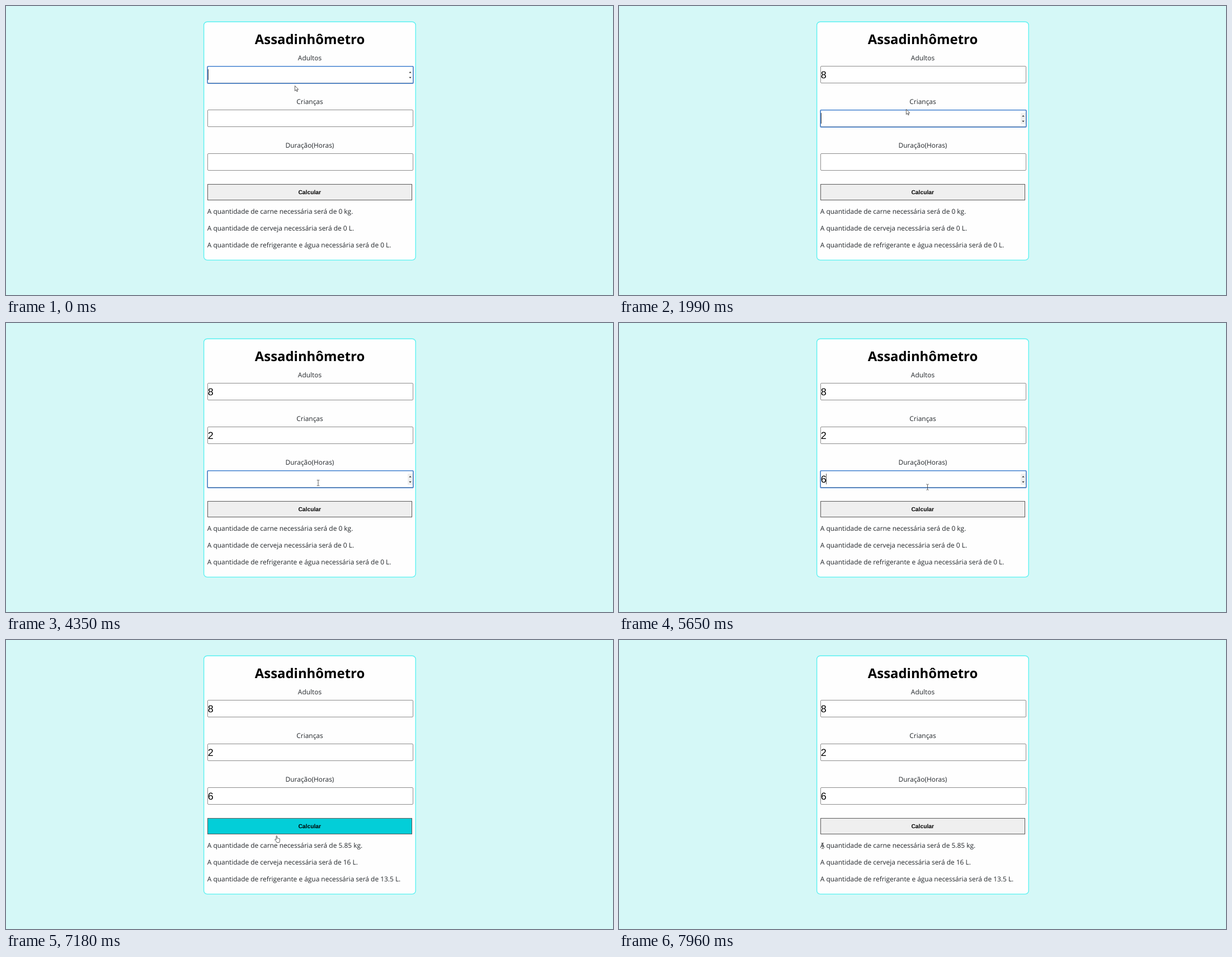
An HTML page that plays this animation: 1085x516 px, repeating every 8 s.

```html
<!DOCTYPE html>
<html lang="pt">
<head>
<meta charset="utf-8">
<style>
html, body { margin: 0; height: 100%; overflow: hidden; background: #d5f8f7; }
svg { display: block; width: 100%; height: 100%; }
text { font: 11.93px "Open Sans", sans-serif; fill: #212529; text-rendering: geometricPrecision; }
.mid { text-anchor: middle; }
.title { font-size: 23.9px; font-weight: 700; fill: #000; }
.digit { font: 17.9px "Liberation Sans", Arial, sans-serif; fill: #000; }
.action { font: bold 10.3px "Liberation Sans", Arial, sans-serif; fill: #000; }
.box { fill: #fff; stroke: #8c8c8c; }
.ring { fill: none; stroke: #4482d0; stroke-width: 1.5; }
.pointer { fill: #fff; stroke: #333; stroke-width: .8; stroke-linejoin: round; }
</style>
</head>
<body>
<svg viewBox="0 0 1085 516">
  <rect x="353.6" y="28.2" width="378.6" height="425.4" rx="6" fill="#fefefe" stroke="#5cf1f1" stroke-width="1.4"/>
  <text class="mid title" x="543" y="68">Assadinhômetro</text>
  <g id="fields"></g>
  <rect id="button" x="360.5" y="318.4" width="365" height="28" stroke="#555"/>
  <text class="mid action" x="542.7" y="335.5">Calcular</text>
  <g id="results"></g>
  <path id="pointer" class="pointer"/>
</svg>
<script>
const $ = id => document.getElementById(id);
const LOOP = 8000;
const HOVER = [5920, 7300], RESULT = 6780;

// Each field: focus span, typing time, spans with a visible caret
const fields = [
  { label: 'Adultos', value: 8, focus: [0, 1590], typed: 650, caret: [[0, 250], [650, 1220]] },
  { label: 'Crianças', value: 2, focus: [1590, 3800], typed: 2890, caret: [[1590, 2110], [2610, 3410]] },
  { label: 'Duração(Horas)', value: 6, focus: [3800, 6500], typed: 5380, caret: [[3800, 4350], [4850, 5920]] }
];
const results = [['carne', 5.85, 'kg'], ['cerveja', 16, 'L'], ['refrigerante e água', 13.5, 'L']];

const shapes = {
  none: '',
  arrow: 'M.4 .4V9.6L2.5 7.6 3.9 10.8 5.3 10.2 3.9 7.1H6.7Z',
  beam: 'M-2.2-5H-.6L0-4.4 .6-5H2.2M-2.2 5H-.6L0 4.4 .6 5H2.2M0-4.4V4.4',
  hand: 'M3 7.6V1.4Q3 .5 3.8 .5T4.6 1.4V5Q5.4 4.4 6.2 5.2 7 4.6 7.7 5.5 9.3 5 9.3 6.8V9.2Q9.2 11 8.3 12.6H4.2Q3.6 11 1 8.2 .2 7 1.2 6.7 2.2 6.6 3 7.6Z'
};
// time, shape, x, y
const moves = [
  [0, 'arrow', 516, 142], [1990, 'arrow', 513, 184], [2110, 'beam', 514.5, 204],
  [2360, 'none', 0, 0], [3290, 'beam', 519.5, 208], [3410, 'arrow', 535, 243],
  [3530, 'beam', 549.5, 273], [3650, 'beam', 556.5, 283], [3800, 'beam', 558, 285.5],
  [5530, 'beam', 555.5, 289], [5650, 'beam', 551.5, 293], [5800, 'arrow', 548, 305],
  [5920, 'hand', 541, 321], [6040, 'hand', 540.5, 325], [6190, 'hand', 540.5, 328],
  [7180, 'hand', 480, 349], [7300, 'arrow', 440, 354], [7420, 'beam', 402, 365],
  [7540, 'beam', 375.5, 365.5], [7690, 'beam', 362.5, 366], [7840, 'beam', 364, 366.5],
  [7960, 'beam', 364, 367.5]
];

$('fields').innerHTML = fields.map((f, i) => {
  const top = 107.5 + 78 * i;
  return `<text class="mid" x="543" y="${top - 10.7}">${f.label}</text>
    <rect class="box" x="360.5" y="${top}" width="367" height="30" rx="1.5"/>
    <g id="focus${i}">
      <rect class="ring" x="360" y="${top + .2}" width="368" height="30.5" rx="1.2"/>
      <rect x="718" y="${top + 5.5}" width="9" height="20" fill="${i ? '#efefef' : '#fff'}"/>
      <path d="M720.3 ${top + 12}h4.4l-2.2-2.6zm0 7.2h4.4l-2.2 2.6z" fill="#333"/>
    </g>
    <text class="digit" id="digit${i}" x="360.7" y="${top + 21.5}">${f.value}</text>
    <rect id="caret${i}" y="${top + 5.5}" width="1" height="19" fill="#555"/>`;
}).join('');

$('results').innerHTML = results.map((r, i) =>
  `<text id="result${i}" x="359.8" y="${371.2 + 29.8 * i}"></text>`).join('');

const within = (t, [from, to]) => t >= from && t < to;
const show = (id, on) => $(id).setAttribute('visibility', on ? 'visible' : 'hidden');

function draw(t) {
  fields.forEach((f, i) => {
    show('focus' + i, within(t, f.focus));
    show('digit' + i, t >= f.typed);
    show('caret' + i, f.caret.some(span => within(t, span)));
    $('caret' + i).setAttribute('x', t < f.typed ? 361 : 370);
  });
  results.forEach(([item, amount, unit], i) => {
    $('result' + i).textContent =
      `A quantidade de ${item} necessária será de ${t < RESULT ? 0 : amount} ${unit}.`;
  });
  $('button').setAttribute('fill', within(t, HOVER) ? '#03ced8' : '#efefef');
  const [, shape, x, y] = moves.findLast(m => m[0] <= t);
  $('pointer').setAttribute('d', shapes[shape]);
  $('pointer').setAttribute('transform', `translate(${x} ${y})`);
}

function tick() {
  draw(performance.now() % LOOP);
  requestAnimationFrame(tick);
}
tick();
</script>
</body>
</html>
```
